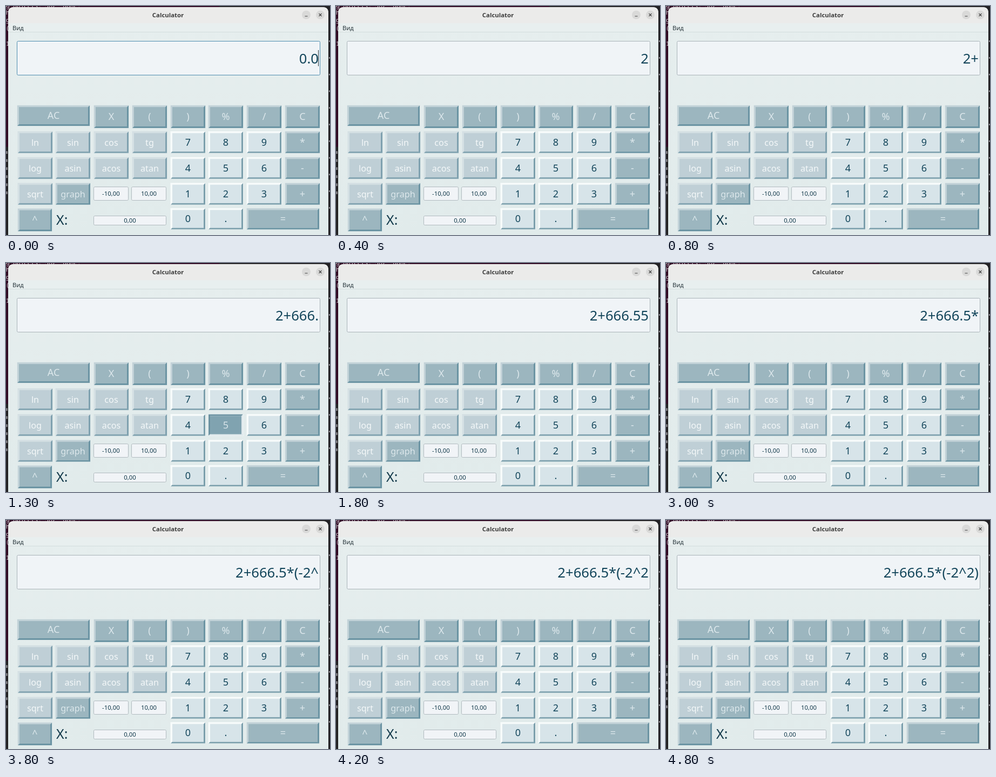
Animation of 600x426 px, one loop 5000 ms. Source, as an HTML page:

```html
<!DOCTYPE html>
<html lang="en">
<head>
<meta charset="utf-8">
<title>Calculator</title>
<style>
  html, body { margin: 0; width: 100%; height: 100%; overflow: hidden; background: #22171f; }
  svg { display: block; width: 600px; height: 426px; font-family: "Noto Sans", "Open Sans", sans-serif; }
  .mid { text-anchor: middle; }
  .small { font-size: 11.4px; fill: #12394a; }
</style>
</head>
<body>
<svg id="stage" viewBox="0 0 600 426" xmlns="http://www.w3.org/2000/svg">
  <defs>
    <linearGradient id="body" x1="0" y1="0" x2="0" y2="1">
      <stop offset="0" stop-color="#e6eeee"/>
      <stop offset="1" stop-color="#e1ebeb"/>
    </linearGradient>
  </defs>
</svg>
<script>
const NS = "http://www.w3.org/2000/svg";
const stage = document.getElementById("stage");
const LOOP = 5000;

function add(tag, attrs, text, parent = stage) {
  const el = document.createElementNS(NS, tag);
  for (const key in attrs) el.setAttribute(key, attrs[key]);
  if (text !== undefined) el.textContent = text;
  parent.appendChild(el);
  return el;
}
const box = (x, y, width, height, fill, more) => add("rect", { x, y, width, height, fill, ...more });
const label = (x, y, size, fill, text, more) =>
  add("text", { x, y, "font-size": size, fill, ...more }, text);

// Terminal showing around the window
box(0, 0, 600, 426, "#222124");
box(0, 0, 395, 262, "#300a24");
label(0, 3, 11, "#d8d2d6", "g objects: 362, done.", { "font-family": "'Noto Sans Mono', monospace", textLength: null });
[["h", 16], ["g", 30], ["(", 45], ["1", 74]].forEach(([s, y]) =>
  label(0, y, 10, "#d8d2d6", s, { "font-family": "'Noto Sans Mono', monospace" }));
for (let y = 270; y < 350; y += 15) box(0, y, 3, 5, "#77757a");
for (let y = 64; y < 390; y += 31) box(598, y, 2, 3, "#89878b");

// Window
add("path", { d: "M4 426V13Q4 2 15 2H586Q597 2 597 13V426Z", fill: "url(#body)" });
add("path", { d: "M4 33V13Q4 2 15 2H586Q597 2 597 13V33Z", fill: "#ebebea" });
box(4, 32, 593, 16, "#e8efef");
box(4, 48, 593, 1, "#d3dddd");
label(300, 21, 11.4, "#3b3b3b", "Calculator", { class: "mid", "font-weight": 700 });
label(12, 45, 11, "#26343a", "Вид", { "font-weight": 500 });
[556, 582].forEach(cx => add("circle", { cx, cy: 16.5, r: 8, fill: "#d9d9d8" }));
add("path", { d: "M553.5 19H558.5M579.5 14L584.5 19M584.5 14L579.5 19", stroke: "#3d3d3d", "stroke-width": 1.1, fill: "none" });

// Display and number fields
const display = box(20.5, 65.5, 561, 63, "#f0f4f7", { rx: 2 });
const entry = label(579, 107, 25.6, "#12455a", "", { "text-anchor": "end" });
const caret = box(578, 82, 1, 30, "#1c2f38");

function field(x, y, w, h, text) {
  box(x + .5, y + .5, w - 1, h - 1, "#f1f4f7", { rx: 2, stroke: "#b1babf" });
  label(x + w / 2, y + h / 2 + 4.2, 11.4, "#12394a", text, { class: "mid" });
}
field(162, 336, 65, 26, "-10,00");
field(232, 336, 65, 26, "10,00");
field(162, 390, 135, 18, "0,00");
label(93, 406.5, 25, "#12394a", "X:");

// Buttons
const LOOKS = {
  dark:   { fill: "#9cb6bf", text: "#dde8ec", light: "#c2d2d8", shade: "#6b94a3" },
  fn:     { fill: "#bfcfd6", text: "#f4f8f9", light: "#d5e0e4", shade: "#7fa1af" },
  digit:  { fill: "#d7e4e9", text: "#12455a", light: "#f7fbfb", shade: "#7b9fac" },
  down:   { fill: "#80a3b0", text: "#d6e3e8", light: "#6b92a1", shade: "#dfe9ec" }
};
const keys = {};

function button(name, x, y, w, h, kind) {
  box(x - .5, y - .5, w + 1, h + 1, kind === "digit" ? "#f5f9f9" : "#d3dfe2");
  const B = 3;
  const top = add("path", { d: `M${x} ${y + h}V${y}H${x + w}l${-B} ${B}H${x + B}V${y + h - B}Z` });
  const low = add("path", { d: `M${x} ${y + h}H${x + w}V${y}l${-B} ${B}V${y + h - B}H${x + B}Z` });
  const face = box(x + B, y + B, w - 2 * B, h - 2 * B);
  const size = /^[a-z]/.test(name) ? 16.2 : 18;
  const text = label(x + w / 2, y + h / 2 + 6, size, "", name, { class: "mid" });
  keys[name] = { kind, top, low, face, text };
}

function paint(key, look) {
  key.top.setAttribute("fill", look.light);
  key.low.setAttribute("fill", look.shade);
  key.face.setAttribute("fill", look.fill);
  key.text.setAttribute("fill", look.text);
}

const colX = i => Math.round(21.6 + 70.75 * i);
button("AC", 21, 185, 134, 38, "dark");
["X", "(", ")", "%", "/", "C"].forEach((s, i) => button(s, colX(i + 2), 185, 64, 42, "dark"));
["ln sin cos tg 7 8 9 *", "log asin acos atan 4 5 6 -", "sqrt graph _ _ 1 2 3 +"].forEach((row, r) =>
  row.split(" ").forEach((s, i) => {
    if (s === "_") return;
    const kind = /\d/.test(s) ? "digit" : i === 7 || s === "graph" ? "dark" : "fn";
    button(s, colX(i), 233.5 + 48 * r, 64, 40, kind);
  }));
button("^", 22, 377, 63, 42, "dark");
button("0", colX(4), 376.5, 64, 39, "digit");
button(".", colX(5), 376.5, 64, 39, "digit");
button("=", colX(6), 376.5, 134, 39, "dark");

// [time, shown text, held key]
const steps = [
  [0, "0.0"], [200, "0.0", "2"], [300, "2"], [500, "2", "+"], [700, "2+"],
  [900, "2+6"], [1000, "2+66"], [1100, "2+666"], [1200, "2+666", "."],
  [1300, "2+666.", "5"], [1500, "2+666.5"], [1700, "2+666.5", "5"], [1800, "2+666.55"],
  [2300, "2+666.55", "C"], [2600, "2+666.5"], [2800, "2+666.5", "*"], [3000, "2+666.5*"],
  [3100, "2+666.5*("], [3200, "2+666.5*(-"], [3300, "2+666.5*(-", "2"], [3400, "2+666.5*(-2"],
  [3500, "2+666.5*(-2", "^"], [3800, "2+666.5*(-2^"], [4100, "2+666.5*(-2^", "2"],
  [4200, "2+666.5*(-2^2"], [4500, "2+666.5*(-2^2", ")"], [4800, "2+666.5*(-2^2)"]
];

let shown = null;
function draw(time) {
  const t = time % LOOP;
  const step = steps.filter(s => s[0] <= t).pop();
  if (step === shown) return;
  shown = step;
  const [at, text, held] = step;
  const focused = at < 200;
  entry.textContent = text;
  caret.setAttribute("visibility", focused ? "visible" : "hidden");
  display.setAttribute("stroke", focused ? "#4e8daf" : "#a9b3b8");
  for (const name in keys) paint(keys[name], name === held ? LOOKS.down : LOOKS[keys[name].kind]);
}

const start = performance.now();
function tick() {
  draw(performance.now() - start);
  requestAnimationFrame(tick);
}
tick();
</script>
</body>
</html>
```
